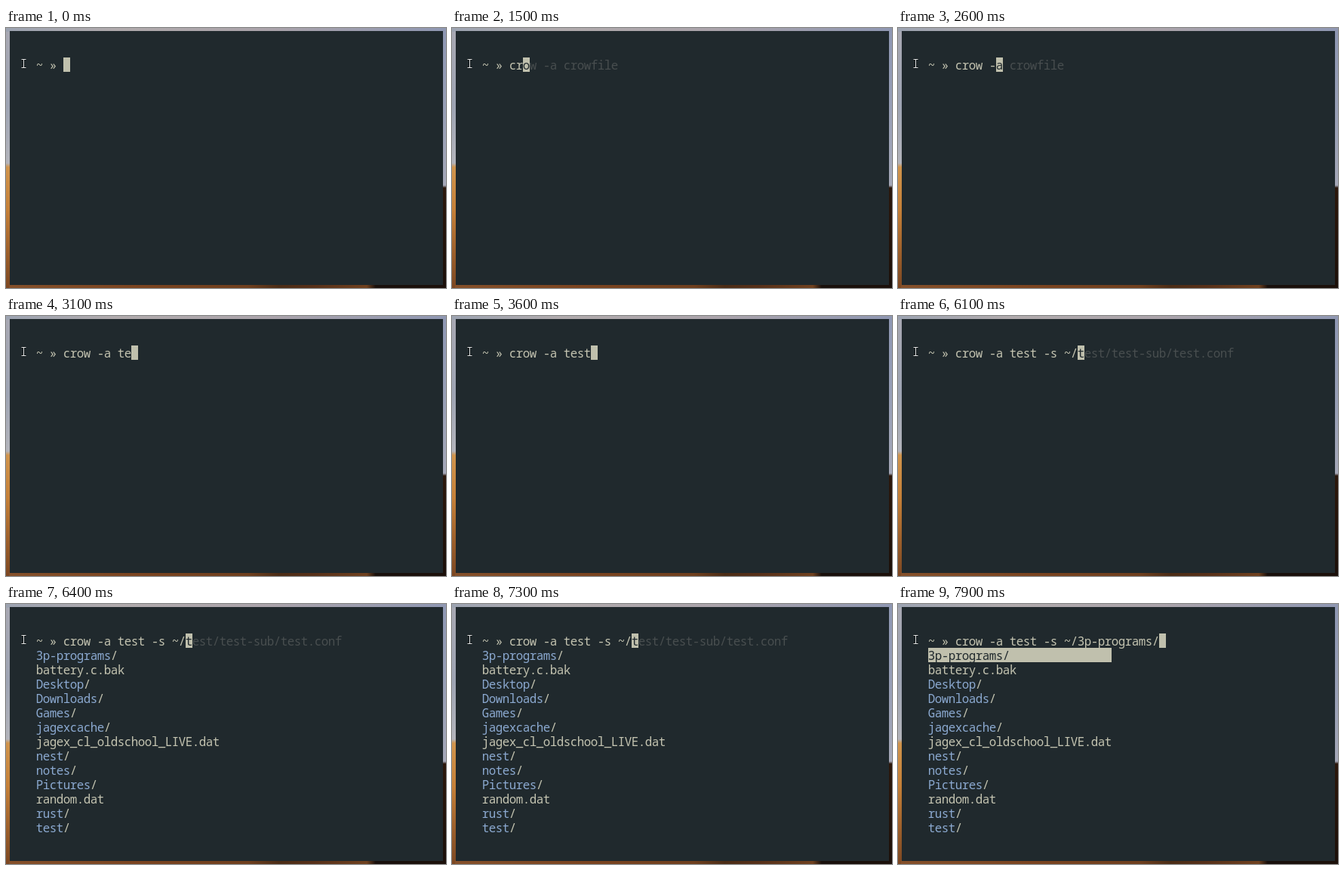
Write an HTML page with a canvas that moves like this. It is 583 px wide and 344 px high and loops after 8 s.

```html
<!DOCTYPE html>
<html lang="en">
<head>
<meta charset="utf-8">
<title>Terminal</title>
<style>
html, body { margin: 0; width: 100%; height: 100%; overflow: hidden; background: #20292d; }
canvas { display: block; }
</style>
</head>
<body>
<canvas id="stage" width="583" height="344"></canvas>
<script>
const ctx = document.getElementById('stage').getContext('2d');
const W = 583, H = 344, LOOP = 8000;
const CELL = 9, LINE = 19, LEFT = 40, TOP = 39, INPUT = 76;
const BG = '#20292d', FG = '#c4c4b1', BLUE = '#8ba9d0', GHOST = '#484e4f', CURSOR = '#c0c0ad';

const FIRST = 'crow -a crowfile';
const PLAIN = 'crow -a test';
const SECOND = 'crow -a test -s ~/test/test-sub/test.conf';
const DONE = 'crow -a test -s ~/3p-programs/';

// time, typed length, full line (the rest is the suggestion)
const STEPS = [
  [0, 0, ''],
  [1500, 2, FIRST], [1600, 3, FIRST], [1700, 4, FIRST], [1800, 5, FIRST],
  [2400, 6, FIRST], [2700, 7, FIRST], [2900, 8, FIRST],
  [3000, 9, 'crow -a t'], [3100, 10, 'crow -a te'], [3400, 11, 'crow -a tes'], [3500, 12, PLAIN],
  [3700, 13, SECOND], [4400, 14, SECOND], [4600, 15, SECOND], [4700, 16, SECOND],
  [5500, 17, SECOND], [5800, 18, SECOND],
  [7900, DONE.length, DONE]
];
const LIST_AT = 6400, PICK_AT = 7900;
const FILES = ['3p-programs/', 'battery.c.bak', 'Desktop/', 'Downloads/', 'Games/',
  'jagexcache/', 'jagex_cl_oldschool_LIVE.dat', 'nest/', 'notes/', 'Pictures/',
  'random.dat', 'rust/', 'test/'];
const LIST_W = Math.max(...FILES.map(f => f.length)) * CELL;

const FACE = '"Noto Sans Mono", "DejaVu Sans Mono", monospace';
ctx.font = `condensed 100px ${FACE}`;
const advance = ctx.measureText('0').width / 100;
const size = Math.min(17, 9.5 / advance);
const FONT = `condensed ${size}px ${FACE}`;

function rect(x, y, w, h, fill) {
  ctx.fillStyle = fill;
  ctx.fillRect(x, y, w, h);
}

function gradient(x, y, stops) {
  const g = ctx.createLinearGradient(0, 0, x, y);
  stops.forEach(([at, color]) => g.addColorStop(at, color));
  return g;
}

function text(str, x, row, color) {
  ctx.fillStyle = color;
  for (let i = 0; i < str.length; i++) {
    ctx.fillText(str[i], x + (i + 0.5) * CELL, TOP + row * LINE + 15.5);
  }
}

const sky = gradient(0, H, [[0, '#a8a8b2'], [0.3, '#9ea4b3'], [0.52, '#b3b4bb'],
  [0.535, '#d0944c'], [0.7, '#c58038'], [0.85, '#a0622c'], [1, '#7c4722']]);
const dusk = gradient(0, H, [[0, '#8e97b3'], [0.35, '#99a0b6'], [0.605, '#a5a8b8'],
  [0.615, '#2b170b'], [1, '#1b0f09']]);
const haze = gradient(W, 0, [[0, '#9ca3b1'], [0.25, '#b0aaac'], [0.6, '#aaa3aa'], [1, '#8f97b2']]);
const sand = gradient(W, 0, [[0, '#85502a'], [0.3, '#7b4420'], [0.55, '#6f3f1e'],
  [0.62, '#4b2c16'], [0.7, '#573019'], [0.82, '#70411f'], [0.84, '#180f0b'], [1, '#1c100a']]);

function desktop() {
  rect(0, 0, 6, H, sky);
  rect(578, 0, 5, H, dusk);
  rect(0, 0, W, 5, haze);
  rect(4, 339, W - 4, 5, sand);
  rect(5, 4, 574, 336, BG);
}

function ibeam() {
  const trace = (color, width) => {
    ctx.strokeStyle = color;
    ctx.lineWidth = width;
    ctx.beginPath();
    ctx.moveTo(20.5, 41.5);
    ctx.lineTo(26.5, 41.5);
    ctx.moveTo(23.5, 41.5);
    ctx.lineTo(23.5, 52.5);
    ctx.moveTo(20.5, 52.5);
    ctx.lineTo(26.5, 52.5);
    ctx.stroke();
  };
  trace('#11181b', 3);
  trace('#e4e6e6', 1);
}

function prompt(t) {
  const [, n, line] = STEPS.filter(s => s[0] <= t).pop();
  const x = INPUT + n * CELL;
  text('~ »', LEFT, 0, FG);
  text(line.slice(0, n), INPUT, 0, FG);
  rect(x, TOP, CELL, LINE, CURSOR);
  text(line.slice(n, n + 1), x, 0, BG);
  text(line.slice(n + 1), x + CELL, 0, GHOST);
}

function listing(picked) {
  FILES.forEach((name, i) => {
    const row = i + 1;
    if (picked && i === 0) {
      rect(LEFT, TOP + LINE, LIST_W, LINE, CURSOR);
      text(name, LEFT, row, BG);
    } else if (name.endsWith('/')) {
      const dir = name.slice(0, -1);
      text(dir, LEFT, row, BLUE);
      text('/', LEFT + dir.length * CELL, row, FG);
    } else {
      text(name, LEFT, row, FG);
    }
  });
}

function draw(now) {
  const t = now % LOOP;
  ctx.font = FONT;
  ctx.textAlign = 'center';
  ctx.textBaseline = 'alphabetic';
  desktop();
  ibeam();
  prompt(t);
  if (t >= LIST_AT) listing(t >= PICK_AT);
}

const start = performance.now();
function tick() {
  draw(performance.now() - start);
  requestAnimationFrame(tick);
}
tick();
</script>
</body>
</html>
```
